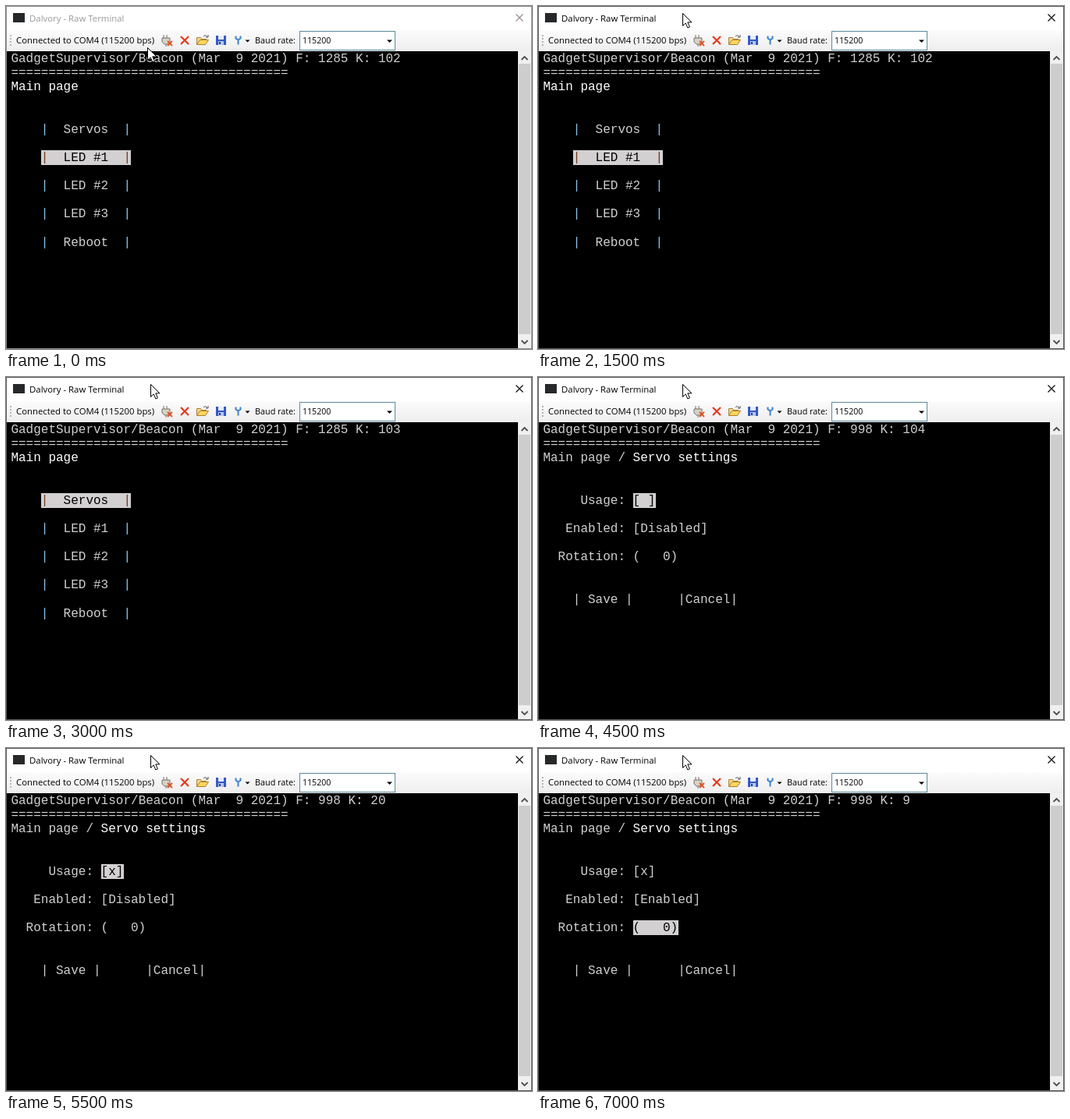
Recreate the animation shown at these times as an HTML page with a canvas. Size 674 px wide and 440 px high, loop 8000 ms.

```html
<!DOCTYPE html>
<html lang="en">
<head>
<meta charset="utf-8">
<title>Serial terminal</title>
<style>
  html, body { margin: 0; width: 100%; height: 100%; overflow: hidden; background: #000; }
  canvas { display: block; }
</style>
</head>
<body>
<canvas id="stage" width="674" height="440"></canvas>
<script>
const ctx = document.getElementById('stage').getContext('2d');
const LOOP = 8000;
const CELL = 9.6, LINE = 18.125, LEFT = 6.4, TOP = 58;
const GREY = '#d0d0d0', WHITE = '#fff', MARK = '#d3d0d2';
const MENU = ['Servos', 'LED #1', 'LED #2', 'LED #3', 'Reboot'];

// Each step keeps the values of the one before it unless it changes them.
const steps = [
  { at: 0, page: 'menu', focus: 1, key: '102', free: 1285, active: false, cursor: [181, 53] },
  { at: 1000, cursor: [187, 8] },
  { at: 1500, active: true, cursor: [185, 9] },
  { at: 3000, focus: 0, key: '103' },
  { at: 3500, page: 'servo', free: 998, key: 'a', used: false, enabled: false },
  { at: 4000, used: true, key: '20' },
  { at: 4500, used: false, key: '104' },
  { at: 5500, used: true, key: '20' },
  { at: 6000, focus: 1, key: '9' },
  { at: 6500, enabled: true, key: '105' },
  { at: 7000, focus: 2, key: '9' }
];

function stateAt(time) {
  return Object.assign({}, ...steps.filter(step => step.at <= time));
}

function rect(x, y, w, h, color) {
  ctx.fillStyle = color;
  ctx.fillRect(x, y, w, h);
}

function frame(x, y, w, h, color) {
  ctx.strokeStyle = color;
  ctx.lineWidth = 1;
  ctx.strokeRect(x + 0.5, y + 0.5, w - 1, h - 1);
}

function path(d, { fill, stroke, width = 1, x = 0, y = 0 }) {
  const shape = new Path2D(d);
  ctx.save();
  ctx.translate(x, y);
  if (fill) { ctx.fillStyle = fill; ctx.fill(shape); }
  if (stroke) { ctx.strokeStyle = stroke; ctx.lineWidth = width; ctx.stroke(shape); }
  ctx.restore();
}

function label(text, x, y, size, color = '#000') {
  ctx.font = `${size}px "Open Sans", "Noto Sans", sans-serif`;
  ctx.fillStyle = color;
  ctx.fillText(text, x, y);
}

function print(text, col, row, color = GREY) {
  ctx.font = '16px "Liberation Mono", monospace';
  ctx.fillStyle = color;
  ctx.fillText(text, LEFT + col * CELL, Math.round(TOP + row * LINE + 14));
}

function highlight(col, row, length) {
  const y = Math.round(TOP + row * LINE);
  rect(Math.round(LEFT + col * CELL), y, Math.round(length * CELL), Math.round(TOP + (row + 1) * LINE) - y + 1, MARK);
}

function drawTitleBar(active) {
  rect(0, 0, 674, 31, '#fff');
  rect(9, 9, 15, 12, '#26282a');
  label('Dalvory - Raw Terminal', 30, 20, 11.4, active ? '#000' : '#999');
  path('M653.5 10.5l9 9m0-9l-9 9', { stroke: active ? '#000' : '#988', width: 1.1 });
}

function drawIcons() {
  // Plug with a red cross
  path('M202 37v4m4-4v4m-6 0h10v5l-3 3h-4l-3-3zm5 8v3', { fill: '#d8d2c4', stroke: '#77716a' });
  path('M207 45l6 6m0-6l-6 6', { stroke: '#e05020', width: 1.8 });
  // Red cross
  path('M224 39l10 10m0-10l-10 10', { stroke: '#e8371c', width: 2.2 });
  // Open folder
  path('M244.5 49.5v-9h5l1 2h6v3', { fill: '#f5d98c', stroke: '#a98032' });
  path('M244.5 49.5l4-6h11l-4 6z', { fill: '#ffd65c', stroke: '#a98032' });
  path('M253 39q3-3 5 1m1-3v3h-3', { stroke: '#555' });
  // Floppy disk
  rect(269, 38, 13, 12, '#3459c4');
  rect(272, 38, 7, 5, '#e8eefb');
  rect(272, 45, 7, 5, '#b8c6e8');
  rect(273, 46, 2, 3, '#24409a');
  // Wrench and drop-down arrow
  path('M294.5 38.5v3l3 2 3-2v-3m-3 5v6', { stroke: '#3b82cc', width: 2 });
  path('M306.5 43.5h6l-3 3z', { fill: '#000' });
}

function drawToolbar() {
  const shade = ctx.createLinearGradient(0, 31, 0, 58);
  shade.addColorStop(0, '#fbfbfb');
  shade.addColorStop(1, '#eeeeee');
  rect(0, 31, 674, 27, shade);
  for (let y = 37; y < 53; y += 4) rect(5, y, 2, 2, '#b4b4b4');
  label('Connected to COM4 (115200 bps)', 13, 48, 11.35);
  drawIcons();
  label('Baud rate:', 319, 48, 10.8);
  rect(376, 32, 123, 25, '#fff');
  frame(376, 32, 123, 25, '#5c8a9c');
  label('115200', 380, 48, 10.6);
  path('M488 43.5h7l-3.5 3.5z', { fill: '#000' });
}

function drawScrollBar() {
  rect(656, 58, 17, 381, '#f0f0f0');
  rect(657, 74, 15, 347, '#cdcdcd');
  path('M660.5 69l4-4 4 4M660.5 429l4 4 4-4', { stroke: '#505050', width: 1.8 });
}

function drawMenu({ focus }) {
  print('Main page', 0, 2, WHITE);
  MENU.forEach((name, i) => {
    const row = 5 + 2 * i, chosen = i === focus;
    const edge = chosen ? '#6b3c18' : '#8cc4ea';
    if (chosen) highlight(4, row, 12);
    print('|', 4, row, edge);
    print(name, 7, row, chosen ? '#000' : GREY);
    print('|', 15, row, edge);
  });
}

function drawServoPage({ focus, used, enabled }) {
  print('Main page / ', 0, 2);
  print('Servo settings', 12, 2, WHITE);
  const fields = [
    ['Usage:', used ? '[x]' : '[ ]'],
    ['Enabled:', enabled ? '[Enabled]' : '[Disabled]'],
    ['Rotation:', '(   0)']
  ];
  // The page opens with its first field in focus.
  fields.forEach(([name, value], i) => {
    const row = 5 + 2 * i;
    print(name, 11 - name.length, row);
    if (i === focus) highlight(12, row, value.length);
    print(value, 12, row, i === focus ? '#000' : GREY);
  });
  print('| Save |', 4, 12);
  print('|Cancel|', 18, 12);
}

function drawCursor([x, y]) {
  path('M.5 .5v16l3.7-3.6 2.6 6.1 2.6-1.1-2.6-6h5.1z', { fill: '#fff', stroke: '#000', x, y });
}

function draw() {
  const state = stateAt(performance.now() % LOOP);
  rect(0, 0, 674, 440, '#000');
  drawTitleBar(state.active);
  drawToolbar();
  drawScrollBar();
  print(`GadgetSupervisor/Beacon (Mar  9 2021) F: ${state.free} K: ${state.key}`, 0, 0);
  print('='.repeat(37), 0, 1);
  (state.page === 'menu' ? drawMenu : drawServoPage)(state);
  frame(0, 0, 674, 440, state.active ? '#55575a' : '#8a8a8a');
  drawCursor(state.cursor);
  requestAnimationFrame(draw);
}

draw();
</script>
</body>
</html>
```
